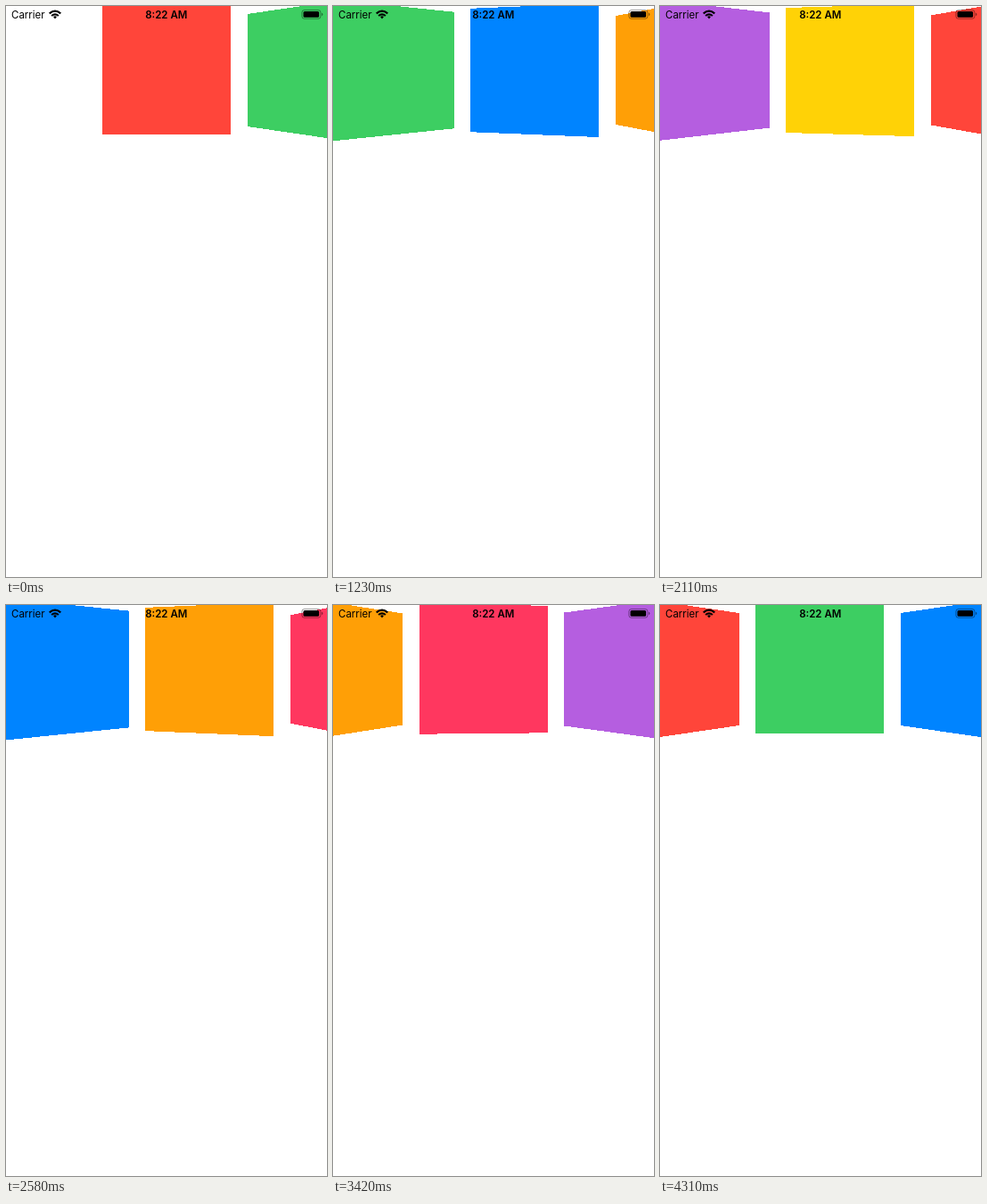
Recreate the animation shown at these times as an HTML page. Size 360 by 640 pixels, loop 4380 ms.

```html
<!DOCTYPE html>
<html lang="en">
<head>
<meta charset="utf-8">
<title>Card carousel</title>
<style>
  html, body { margin: 0; width: 100%; height: 100%; overflow: hidden; background: #fff; }
  svg { display: block; width: 360px; height: 640px; }
  text { font-family: Inter, Roboto, sans-serif; font-size: 11.5px; }
</style>
</head>
<body>
<svg viewBox="0 0 360 640">
  <g id="cards" shape-rendering="crispEdges"></g>
  <text x="6" y="14">Carrier</text>
  <g fill="none" stroke="#000" stroke-width="2.1">
    <path d="M48.7 8.4Q55 2.9 61.3 8.4"/>
    <path d="M51.1 11Q55 7.6 58.9 11"/>
    <path d="M53 12.1Q55 10.5 57 12.1L55 14.5Z" fill="#000" stroke="none"/>
  </g>
  <text x="179.8" y="14" text-anchor="middle" font-weight="600">8:22 AM</text>
  <rect x="331.9" y="4.6" width="21" height="9.6" rx="2.6" fill="none" stroke="#000" stroke-opacity=".4"/>
  <rect x="333.5" y="6.1" width="17.6" height="6.6" rx="1.5"/>
  <path d="M354 7.8q1.3 .4 1.3 1.6t-1.3 1.6z" fill-opacity=".45"/>
</svg>
<script>
const LOOP = 4380, REST = 409, STEP = 111;
const SIZE = 144, MID = 180, TILT = 1 / 7;
const COLORS = ['#ff453a', '#3dce62', '#0084ff', '#ff9f06', '#ff375f', '#b55ee0', '#ffd206'];

// The scroll speeds up, runs on and brakes: [screen refresh, page]
const KEYS = [[0, 0], [4, 0.806], [11, 3.238], [15, 5.798], [23, 13.833], [30, 20.711], [35, 22.004]];

const holder = document.getElementById('cards');
const cards = Array.from({ length: 5 }, () => {
  const card = document.createElementNS('http://www.w3.org/2000/svg', 'polygon');
  return holder.appendChild(card);
});

// Speed at a key, from its neighbours; the scroll starts and ends at rest
function slope(i) {
  const a = KEYS[i - 1], b = KEYS[i + 1];
  return a && b ? (b[1] - a[1]) / (b[0] - a[0]) : 0;
}

// Smooth cubic curve through the keys
function scrollAt(n) {
  const i = Math.max(1, KEYS.findIndex(key => n <= key[0]));
  const [n0, p0] = KEYS[i - 1], [n1, p1] = KEYS[i];
  const h = n1 - n0, u = (n - n0) / h, w = 1 - u;
  return w * w * (1 + 2 * u) * p0 + u * u * (3 - 2 * u) * p1
    + h * u * w * (w * slope(i - 1) - u * slope(i));
}

// Corners of a card that lies d pages from the middle
function corners(d) {
  const half = SIZE / 2;
  const left = MID - half + 161.4 * d + 1.1 * d * Math.abs(d), right = left + SIZE;
  const l = half / (1 + TILT * d), r = half / (1 - TILT * d);
  return [[left, half - l], [right, half - r], [right, half + r], [left, half + l]]
    .map(point => point.map(n => n.toFixed(2)).join()).join(' ');
}

function draw(ms) {
  const refresh = Math.max(0, Math.floor((ms - REST) / STEP));
  const pos = scrollAt(refresh), first = Math.round(pos) - 2;
  cards.forEach((card, i) => {
    const k = first + i;
    card.setAttribute('visibility', k < 0 ? 'hidden' : 'visible');
    if (k < 0) return;
    card.setAttribute('points', corners(k - pos));
    card.setAttribute('fill', COLORS[k % COLORS.length]);
  });
}

const start = performance.now();
function frame() {
  draw((performance.now() - start) % LOOP);
  requestAnimationFrame(frame);
}
frame();
</script>
</body>
</html>
```
